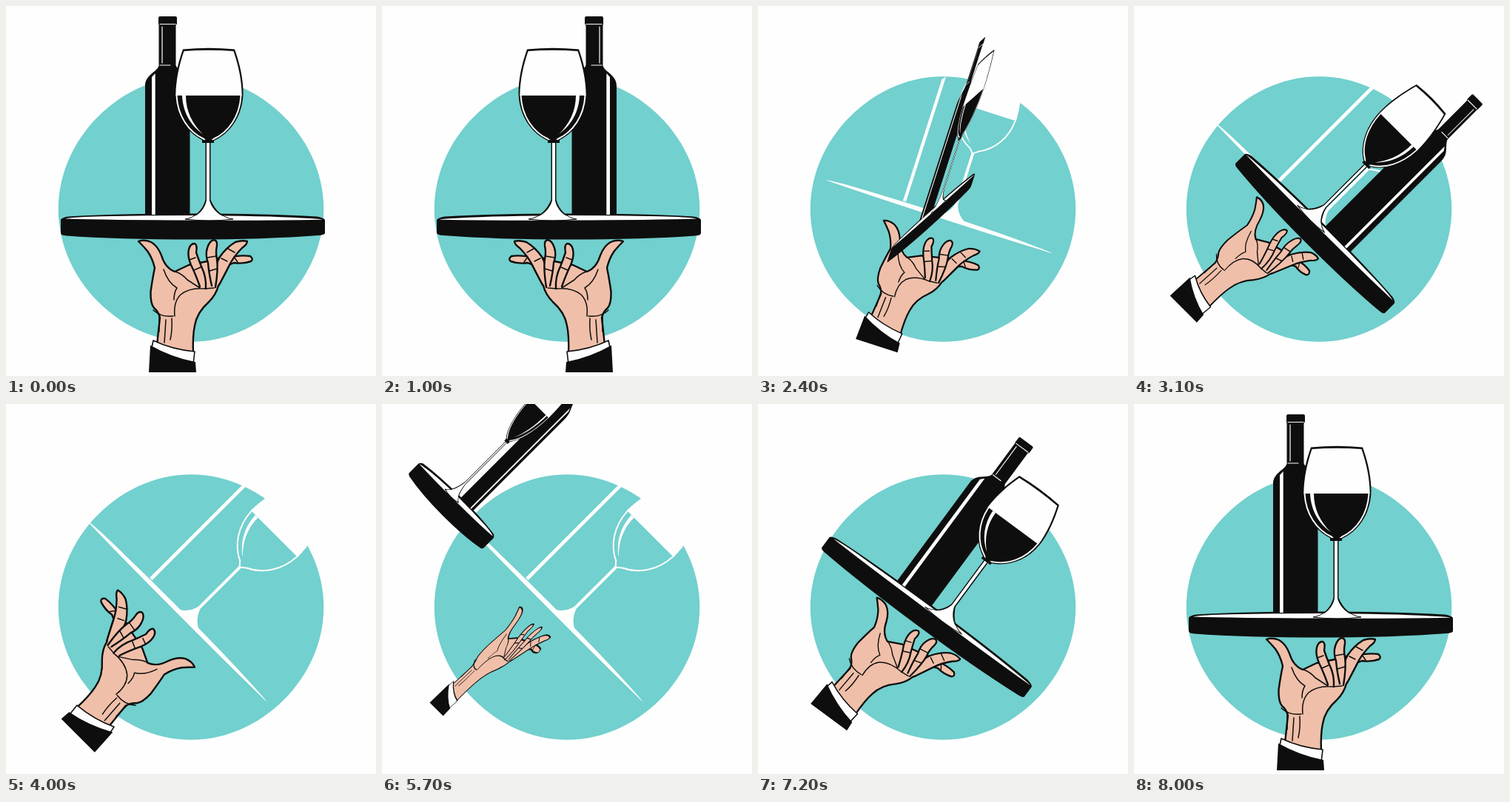
An HTML page with a canvas that plays this animation: 500x500 px, repeating every 9 s.

```html
<!DOCTYPE html>
<html lang="en">
<head>
<meta charset="utf-8">
<title>Waiter's tray</title>
<style>
html, body { margin: 0; width: 100%; height: 100%; overflow: hidden; background: #fefefe; }
canvas { display: block; width: 500px; height: 500px; }
</style>
</head>
<body>
<canvas id="stage" width="500" height="500"></canvas>
<script>
const ctx = document.getElementById('stage').getContext('2d');
const INK = '#0e0e0e', PAPER = '#fefefe', TEAL = '#72d0ce', SKIN = '#f0bfa9';
const PIVOT = [252.5, 255];
const LOOP = 9000, BEAT = 1000, STEP = 100;

// Poses are affine matrices around PIVOT; moves blend them linearly.
const K = Math.SQRT1_2;
const upright = [1, 0, 0, 1, 0, 0];
const flipped = [-1, 0, 0, 1, 0, 0];
const tilt = (side, x = 0, y = 0) => [side * K, side * K, -K, K, x, y];
const tilted = tilt(1);
const open = tilt(-1, -5, 4), reach = tilt(1, 0, -8);
const spun = tilt(-1, -16, -17), gone = tilt(1, 368, 372);
const coming = tilt(1, -396, -428), caught = tilt(-1, -14, -28);

// One pose per beat for each layer
const start = [upright, flipped, upright];
const tracks = {
  hand: [...start, tilted, open, open, reach, tilted, upright, upright],
  shine: [...start, tilted, tilted, tilted, tilted, tilted, upright, upright],
  tray: [...start, spun, gone, coming, caught, tilted, upright, upright]
};
const HOLDS = [4, 8];

const bottle = new Path2D(
  'M206 16Q206 14 208 14H229Q231 14 231 16V24L229.5 26V80C232 88 248 92 248.5 108' +
  'V283Q248 287 240 287H196Q188 287 188 283V108C188 93 203 90 206.500 81V26L206 24Z');
const trayBody = new Path2D(
  'M74 289Q75 286 84 284.500Q150 280.500 252 280.500Q350 280.500 420 284.500Q429 286 431 289' +
  'V307Q430 309.500 422 310Q350 315.500 252 315.500Q150 315.500 82 310.500Q74 310 74 307Z');
const bowl = new Path2D(
  'M239 58.500C232 78 227 100 227.500 120C229 150 246 173 268 182.500H280' +
  'C302 173 319 150 320.500 120C321 100 316 78 309 58.500Q274 55 239 58.500Z');
const foot = new Path2D(
  'M270 184V262C266 276 256 286 242 288Q274 292 307 288C292 286 282 276 276 262V184Z');

const trayTop = new Path2D(
  'M80 287.500Q92 285 130 284.300Q190 283 252 283Q350 283.500 400 286.500Q422 287.500 428 288.700' +
  'Q350 290 252 289.500Q140 289.300 80 287.500Z');
const emptyGlass = new Path2D(
  'M240.500 61Q274 58.500 307.500 61C314 80 318.500 100 318.700 121H229.300C229.500 100 234 80 240.500 61Z');
const footShine = new Path2D(
  'M271 184V263C268 276 259 284 248 287.300Q274 290 301 287.300C289 284 279 276 275 263V184Z');
const glassEdge = new Path2D(
  'M230.500 121C232 149 247 170 267 179.500L271 184M317.500 121C316 149 301 170 281 179.500L275 184');
const crescent = new Path2D(
  'M238 121H243C243 142 252 160 266 173C250 162 239 144 238 121Z');
const bottleShine = new Path2D('M197 96L201.700 91V282H197Z');
const neckShine = new Path2D('M211 28V77M208 24.500H229M208 80H222');

const pinky = new Path2D(
  'M298 340Q318 336 330 338Q335 342 331 345Q320 349 308 347L294 353');
const palm = new Path2D(
  'M204 458L208 421Q206 413 200 408Q195 402 195.500 386Q198 368 201 354Q198 341 191 331' +
  'Q185 324 179 318Q187 315 196 319Q205 324 210 337Q215 354 228 359L247 350' +
  'L272 345L298 338L302 350Q296 362 287 378Q284 390 274 400Q258 414 255 432Q252 446 253 470');
const ring = new Path2D(
  'M284 362Q283 348 289 339Q298 326 310 319Q319 316 326 318Q326 322 319 327Q309 337 303 348L288 377');
const middle = new Path2D(
  'M278 378Q274 360 273 347Q269 336 272 327Q275 317 281 316Q286 317 285 324Q283 333 285 342Q287 356 283 380');
const index = new Path2D(
  'M262 379Q256 362 250 350Q245 338 247 329Q249 321 255 321Q259 323 257 333Q260 342 264 352Q271 366 270 382');
const creases = new Path2D(
  'M229 359Q238 362 245 370L262 381M213 356Q219 374 231 381M199 411Q210 421 226 419' +
  'M228 419Q226 400 236 390Q248 380 269 382L281 381M231 381Q227 387 227 397' +
  'M216 424L214 455M224 422Q225 438 222 451M207 420V440M248 343L256 340M254 357L263 353' +
  'M272 340L284 338M275 358L285 355M291 341L299 345M300 328L309 333M308 339L313 346');
const cuff = new Path2D('M199 452Q224 464 255 467L253 484L196 466Z');
const sleeve = new Path2D('M195 458.500Q224 475 256 481L257 495H193Z');

function fill(color, ...paths) {
  ctx.fillStyle = color;
  paths.forEach(p => ctx.fill(p));
}

function line(color, width, ...paths) {
  ctx.strokeStyle = color;
  ctx.lineWidth = width;
  paths.forEach(p => ctx.stroke(p));
}

function drawDisc() {
  ctx.beginPath();
  for (let i = 0; i < 120; i++) {
    const a = i * Math.PI / 60;
    const r = 179.3 - 2 * Math.sin(2 * a) ** 2;
    ctx.lineTo(250 + r * Math.cos(a), 274.5 + r * Math.sin(a));
  }
  ctx.fillStyle = TEAL;
  ctx.fill();
}

function drawShine() {
  fill(PAPER, trayTop, emptyGlass, footShine, crescent, bottleShine);
  line(PAPER, 2, glassEdge);
  line(PAPER, 1.2, neckShine);
}

function drawTray() {
  fill(INK, bottle, trayBody, bowl, foot);
  drawShine();
  line(INK, 1, foot);
  ctx.fillStyle = INK;
  ctx.fillRect(265, 181, 16, 4);
}

function drawHand() {
  for (const part of [pinky, palm, ring, middle, index]) {
    fill(SKIN, part);
    line(INK, 2.4, part);
  }
  line(INK, 1.5, creases);
  fill(PAPER, cuff);
  line(INK, 1.6, cuff);
  fill(INK, sleeve);
}

function layer(name, t, draw) {
  const beat = Math.floor(t / BEAT);
  const u = HOLDS.includes(beat) ? 0 : t % BEAT / BEAT;
  const from = tracks[name][beat], to = tracks[name][beat + 1];
  const m = from.map((v, i) => v + (to[i] - v) * u);
  ctx.save();
  ctx.translate(...PIVOT);
  ctx.transform(...m);
  ctx.translate(-PIVOT[0], -PIVOT[1]);
  draw();
  ctx.restore();
}

function frame(now) {
  const t = Math.floor(now % LOOP / STEP) * STEP;
  ctx.fillStyle = PAPER;
  ctx.fillRect(0, 0, 500, 500);
  ctx.lineJoin = ctx.lineCap = 'round';
  drawDisc();
  layer('shine', t, drawShine);
  layer('hand', t, drawHand);
  layer('tray', t, drawTray);
}

let begin;
function tick(now) {
  begin ??= now;
  frame(Math.max(0, now - begin));
  requestAnimationFrame(tick);
}
frame(0);
requestAnimationFrame(tick);
</script>
</body>
</html>
```
